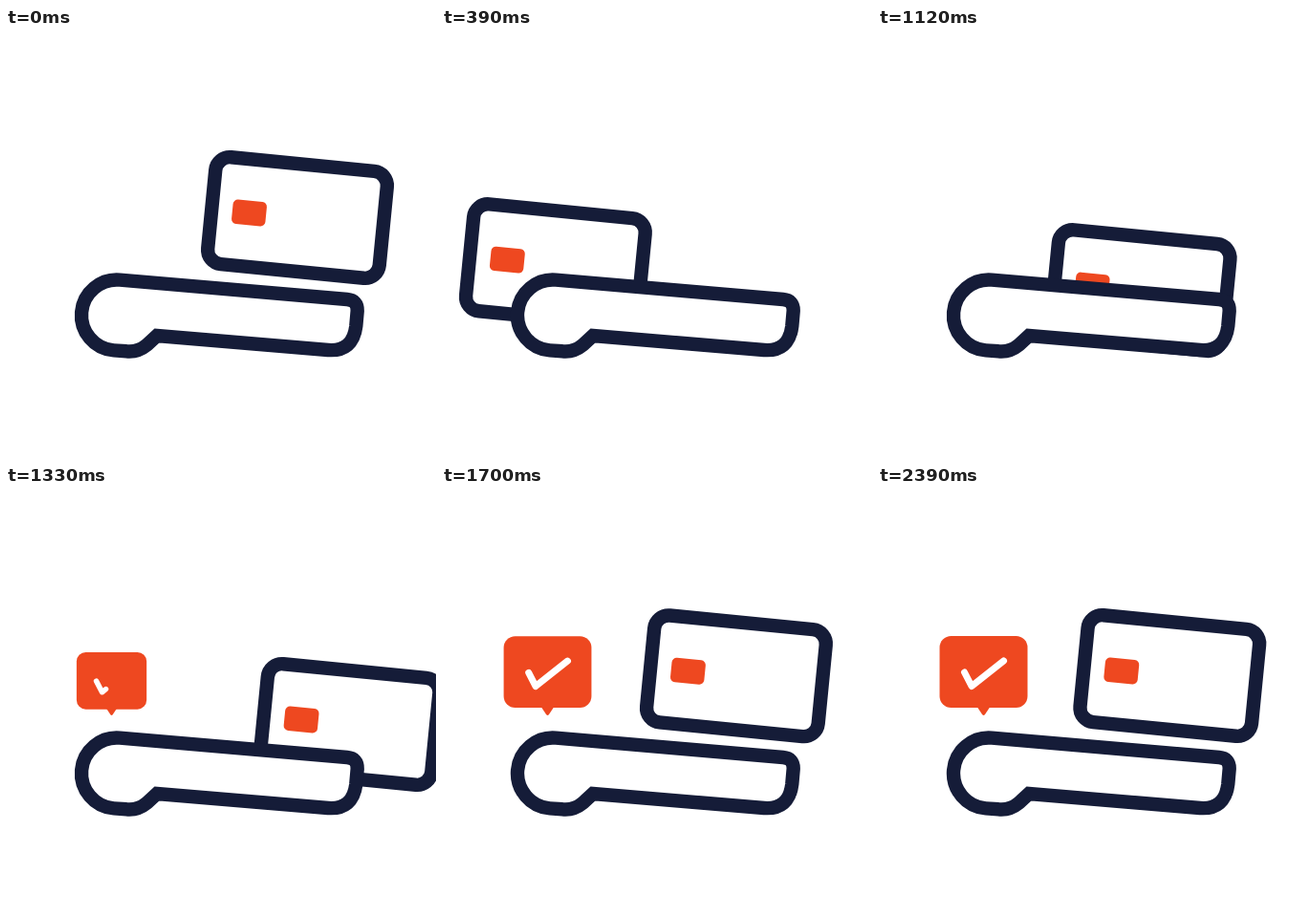
Animation, 450 px wide and 450 px high, one loop 2420 ms. Source, as an HTML page:

```html
<!DOCTYPE html>
<html lang="en">
<head>
<meta charset="utf-8">
<title>Card payment</title>
<style>
  html, body { margin: 0; width: 100%; height: 100%; overflow: hidden; background: #fff; }
  svg { display: block; width: 100%; height: 100%; }
  .line { fill: #fff; stroke: #151c38; stroke-width: 14.4; }
  .accent { fill: #ee4820; }
  #tick { fill: none; stroke: #fff; stroke-width: 7; stroke-linecap: round; stroke-linejoin: round; }
</style>
</head>
<body>
<svg viewBox="0 0 450 450">
  <g id="card">
    <g transform="translate(305 198.5) rotate(5.6)">
      <rect class="line" x="-90.2" y="-56.2" width="180.4" height="112.4" rx="15"/>
      <rect class="accent" x="-68.5" y="-12.8" width="35.5" height="25.5" rx="5"/>
    </g>
  </g>
  <path class="line" d="M119.2 263.6 L357 284 Q368 285 367.7 296 L366.3 312 Q363 339 337 337
    L158 322 L147 332 Q138 339.5 126 338.3 L112.8 337.4 A37 37 0 0 1 119.2 263.6 Z"/>
  <g id="bubble">
    <rect class="accent" x="64.5" y="157" width="92" height="75" rx="12"/>
    <path class="accent" d="M103 230 L109 239 Q110.5 241 112 239 L118 230 Z"/>
    <path id="tick" pathLength="1" stroke-dasharray="1 2" d="M90.5 195 L98 209.5 L131.5 183"/>
  </g>
</svg>
<script>
const LOOP = 2420;

// Keys: time, then values
const cardKeys = [
  [0, 0, 0], [100, -16, -2], [200, -90, 5], [300, -163, 31], [390, -186, 49],
  [470, -188.5, 55], [560, -188.5, 59], [680, -186, 60], [790, -178, 61],
  [900, -152, 63.5], [1010, -98, 69], [1120, -31, 76], [1200, 20, 84],
  [1300, 54, 60], [1450, 39.5, 17.5], [1640, 10, 2], [1700, 3, 0.3],
  [1800, 1.2, 0], [2420, 0.3, 0]
];
const scaleKeys = [
  [1200, 0], [1300, 0.6], [1360, 0.95], [1410, 1.03], [1450, 1.045],
  [1510, 1.03], [1640, 1], [LOOP, 1]
];
const tickKeys = [[1270, 0], [1360, 0.6], [1450, 0.95], [1520, 1], [LOOP, 1]];

// Smooth curve through the keys, at rest at both ends
function sample(keys, t, axis = 1) {
  const last = keys.length - 1;
  if (t <= keys[0][0]) return keys[0][axis];
  const i = Math.min(keys.findIndex(k => k[0] >= t), last);
  const slope = n => n === 0 || n === last ? 0 :
    (keys[n + 1][axis] - keys[n - 1][axis]) / (keys[n + 1][0] - keys[n - 1][0]);
  const a = keys[i - 1], b = keys[i], span = b[0] - a[0];
  const u = (t - a[0]) / span, v = 1 - u;
  return v * v * ((1 + 2 * u) * a[axis] + u * span * slope(i - 1)) +
         u * u * ((1 + 2 * v) * b[axis] - v * span * slope(i));
}

const [card, bubble, tick] = ['card', 'bubble', 'tick'].map(id => document.getElementById(id));

function draw() {
  const t = performance.now() % LOOP;
  card.setAttribute('transform', `translate(${sample(cardKeys, t)} ${sample(cardKeys, t, 2)})`);

  const scale = sample(scaleKeys, t);
  bubble.style.display = scale > 0 ? '' : 'none';
  bubble.setAttribute('transform', `translate(110.5 240) scale(${scale}) translate(-110.5 -240)`);

  const drawn = sample(tickKeys, t);
  tick.style.display = drawn > 0 ? '' : 'none';
  tick.setAttribute('stroke-dashoffset', 1 - drawn);
  requestAnimationFrame(draw);
}
draw();
</script>
</body>
</html>
```
